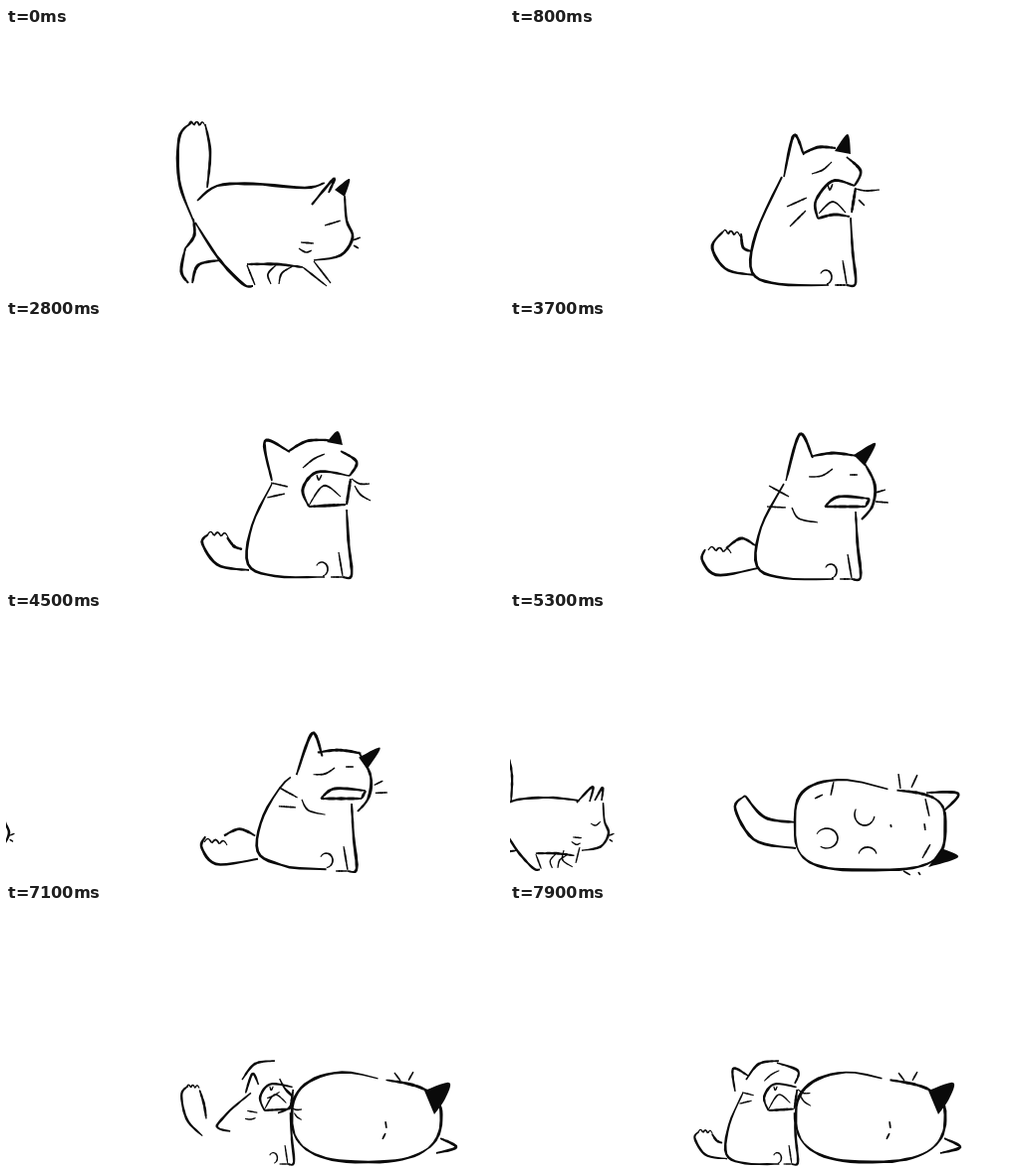
Write an HTML page that moves like this. It is 500 px wide and 266 px high and loops after 8 s.

```html
<!DOCTYPE html>
<html lang="en">
<head>
<meta charset="utf-8">
<title>Two cats</title>
<style>
html, body { margin: 0; width: 100%; height: 100%; overflow: hidden; background: #fff; }
svg { display: block; width: 100vw; height: 100vh; fill: #0a0a0a; }
</style>
</head>
<body>
<svg viewBox="0 0 500 266" preserveAspectRatio="none">
  <g id="big"><path class="brush"/><path class="ink"/></g>
  <g id="small"><path class="brush"/><path class="ink"/></g>
</svg>
<script>
const LOOP = 8000, STEP = 100, SAMPLES = 20;
const BOLD = /^(tail|back|top|bottom|ear|face|mouth|chest|hind|belly|side)/;

const clamp = (v, lo = 0, hi = 1) => Math.max(lo, Math.min(hi, v));
const lerp = (a, b, u) => a + (b - a) * u;
const ease = u => u * u * (3 - 2 * u);
const sample = fn => Array.from({ length: SAMPLES + 1 }, (_, i) => fn(i / SAMPLES));
const power = (v, e) => Math.sign(v) * Math.abs(v) ** e;

// Every stroke has the same number of samples, so any two can be blended.

// Smooth curve through a few key points.
function path(...c) {
  const last = c.length / 2 - 1;
  return sample(u => {
    const i = Math.min(Math.floor(u * last), last - 1), s = u * last - i;
    return [0, 1].map(axis => {
      const at = k => c[2 * clamp(i + k, 0, last) + axis];
      const [a, b, d, e] = [at(-1), at(0), at(1), at(2)];
      return b + s * ((d - a) + s * ((2 * a - 5 * b + 4 * d - e) + s * (3 * (b - d) + e - a))) / 2;
    });
  });
}

// Arc of a squarish oval; its upper edge can sag and ripple towards the right.
function blob({ cx, cy, rx, ry, square = 2, sag = 0, ripple = 0 }, from, to) {
  return sample(u => {
    const a = lerp(from, to, u) * Math.PI / 180;
    const x = power(Math.cos(a), 2 / square), y = power(Math.sin(a), 2 / square);
    const right = (1 + Math.tanh(4 * x)) / 2;
    const dent = y < 0 ? -y * right * (sag + ripple * Math.cos((x - .27) * 12)) : 0;
    return [cx + rx * x, cy + ry * y + dent];
  });
}
const oval = (cx, cy, rx, ry, from, to) => blob({ cx, cy, rx, ry }, from, to);

// Furry tail end.
const ragged = (x0, y0, x1, y1, teeth = 3) => sample(u =>
  [lerp(x0, x1, u), lerp(y0, y1, u) - 4 * Math.abs(Math.sin(u * teeth * Math.PI))]);

const mapPose = (pose, fn) => Object.fromEntries(
  Object.entries(pose).map(([name, pts]) => [name, pts.map(pt => fn(pt, name))]));
const shift = (pose, dx, dy = 0) => mapPose(pose, ([x, y]) => [x + dx, y + dy]);

const walk = {
  tail: path(188, 194, 174, 155, 174, 110, 187, 95),
  tailEdge: path(200, 97, 205, 125, 202, 161),
  tip: ragged(183, 98, 200, 99),
  back: path(320, 156, 300, 161, 248, 157, 212, 159, 192, 174),
  ear: path(307, 178, 329, 152, 324, 166),
  black: path(330, 163, 345, 152, 340, 170),
  face: path(340, 169, 342, 194, 348, 211, 336, 229, 309, 234),
  eye: path(320, 199, 336, 194),
  whiskerR: path(348, 214, 356, 211), whiskerR2: path(349, 219, 354, 222),
  whiskerL: path(296, 216, 309, 217), whiskerL2: path(294, 222, 301, 226, 307, 224),
  hind: path(188, 192, 189, 209, 180, 222),
  hindThigh: path(190, 196, 214, 233, 238, 258, 248, 260),
  hindLeg1: path(180, 222, 176, 245, 183, 257), hindLeg2: path(214, 234, 193, 239, 187, 257),
  belly: path(242, 238, 272, 238, 298, 241),
  leg3: path(242, 239, 250, 259), leg4: path(271, 239, 263, 248, 266, 258),
  leg5: path(288, 240, 277, 247, 274, 258), leg6: path(298, 241, 322, 260),
  leg7: path(309, 235, 326, 257)
};

const sitting = (neckX, neckY) => ({
  back: path(neckX, neckY, 247, 207, 243, 246, 270, 258, 320, 259),
  chest: path(342, 191, 344, 225, 347, 257, 338, 259),
  leg1: path(334, 234, 338, 258), toe: path(338, 259, 326, 259),
  paw: oval(317, 251, 6, 7, -150, 80)
});

const howl = {
  ...sitting(273, 150),
  tail: path(245, 249, 217, 243, 203, 221, 214, 205),
  tailEdge: path(232, 207, 234, 221, 242, 225),
  tip: ragged(213, 207, 231, 210),
  ear: path(275, 150, 285, 108, 295, 128), top: path(295, 126, 310, 120, 327, 121),
  black: path(326, 124, 339, 107, 342, 127),
  face: path(338, 130, 352, 144, 346, 159),
  mouth: path(346, 159, 324, 154, 307, 174, 309, 192),
  mouthLow: path(309, 192, 325, 188, 341, 190), mouthEdge: path(347, 161, 343, 186),
  tongue: path(310, 187, 324, 175, 337, 186), tooth: path(319, 157, 321, 163, 324, 157),
  eye: path(303, 147, 314, 143, 323, 135),
  whiskerR: path(347, 162, 357, 164, 371, 163), whiskerR2: path(350, 173, 356, 179),
  whiskerL: path(278, 180, 298, 171), whiskerL2: path(281, 200, 297, 184)
};

const wail = {
  ...sitting(267, 165),
  tail: path(244, 252, 213, 247, 197, 225, 203, 216),
  tailEdge: path(222, 219, 229, 228, 237, 231),
  tip: ragged(202, 217, 223, 219),
  ear: path(267, 162, 260, 122, 285, 133), top: path(284, 132, 302, 122, 324, 121),
  black: path(322, 123, 333, 112, 338, 126),
  face: path(336, 132, 352, 143, 345, 157),
  mouth: path(345, 157, 313, 153, 298, 170, 304, 188),
  mouthLow: path(304, 188, 341, 186), mouthEdge: path(346, 160, 342, 186),
  tongue: path(304, 187, 319, 167, 336, 178), tooth: path(312, 156, 314, 161, 317, 156),
  eye: path(298, 149, 309, 140, 320, 135),
  whiskerR: path(347, 160, 355, 165, 365, 165), whiskerR2: path(350, 167, 356, 176, 366, 182),
  whiskerL: path(266, 164, 283, 168), whiskerL2: path(262, 179, 280, 175)
};

const sulk = {
  ...shift(sitting(270, 163), 5, 2),
  tail: path(249, 250, 208, 257, 193, 242, 196, 231),
  tailEdge: path(217, 230, 232, 220, 246, 227),
  tip: ragged(199, 232, 222, 235),
  ear: path(277, 162, 291, 115, 304, 139), top: path(304, 137, 325, 134, 348, 137),
  black: path(345, 136, 367, 124, 356, 147),
  face: path(354, 141, 366, 165, 364, 187, 353, 201),
  mouth: path(361, 180, 330, 178, 316, 188),
  mouthLow: path(316, 188, 357, 188), mouthEdge: path(361, 180, 357, 188),
  eye: path(300, 158, 313, 157, 324, 150), brow: path(341, 156, 349, 156),
  cheek: path(283, 189, 290, 200, 309, 204),
  whiskerR: path(367, 174, 377, 171), whiskerR2: path(367, 183, 380, 184),
  whiskerL: path(260, 167, 280, 178), whiskerL2: path(258, 188, 277, 189)
};

const lying = body => ({
  back: blob(body, 275, 150), top: blob(body, 280, 325),
  side: blob(body, 325, 400), bottom: blob(body, 150, 40)
});

const flopped = {
  ...lying({ cx: 361.5, cy: 214, rx: 75.5, ry: 46, square: 3.4, sag: 12 }),
  tail: path(287, 238, 246, 230, 226, 198, 236, 185),
  tailEdge: path(236, 185, 256, 207, 287, 212),
  ear: path(418, 182, 450, 183, 435, 201),
  black: path(433, 238, 450, 247, 420, 257),
  foot: path(306, 188, 314, 184), foot2: path(325, 171, 322, 185),
  paw: oval(318, 228, 11, 10, 205, 485),
  paw2: oval(356, 204, 10, 11, 210, 10), paw3: oval(359, 245, 9, 8, 190, 350),
  eye: path(382, 214, 383, 217), eye2: path(416, 213, 417, 220),
  cheek: path(417, 188, 421, 206), cheek2: path(414, 248, 422, 234),
  whiskerR: path(392, 178, 390, 163), whiskerR2: path(403, 177, 409, 164),
  whiskerL: path(395, 261, 402, 265), whiskerL2: path(410, 262, 412, 265)
};

const rolled = {
  ...lying({ cx: 363, cy: 217, rx: 78, ry: 43, square: 3.2, sag: 6, ripple: 4 }),
  tail: path(290, 253, 252, 256, 235, 240, 239, 228),
  tailEdge: path(239, 228, 262, 232, 284, 226),
  foot: path(291, 188, 294, 166, 303, 177),
  black: path(412, 252, 426, 235, 455, 229, 438, 248),
  paw: path(296, 206, 314, 185, 326, 203),
  paw2: oval(354, 205, 12, 14, 180, 355), paw3: path(384, 202, 391, 194, 398, 194),
  cheek: path(403, 203, 406, 195), cheek2: path(418, 207, 426, 202)
};

const turned = {
  ...lying({ cx: 362, cy: 214, rx: 75, ry: 46, square: 2.6, sag: 10 }),
  ear: path(436, 236, 452, 245, 432, 251),
  black: path(420, 188, 445, 180, 441, 196, 430, 212),
  eye: path(381, 219, 382, 226), eye2: path(381, 231, 378, 237),
  whiskerR: path(396, 178, 390, 170), whiskerR2: path(404, 178, 409, 169)
};

// The kitten is a smaller copy of the big cat, without the black ear.
function kitten({ black, ...pose }, [fromX, fromY], [toX, toY], tall) {
  return mapPose(pose, ([x, y]) => [toX + (x - fromX) * .69, toY + (y - fromY) * tall]);
}

const kittenWalk = {
  ...kitten(walk, [348, 258], [99, 258], .74),
  tailEdge: path(-2, 143, 2, 165, 1, 192),
  back: path(70, 190, 40, 187, 8, 189, -8, 196),
  ear: path(67, 192, 83, 176, 80, 191), ear2: path(85, 190, 93, 177, 92, 190),
  eye: path(81, 213, 86, 215, 91, 211),
  leg6: path(54, 240, 53, 250, 63, 257), leg7: path(70, 237, 66, 253)
};

const loaf = {
  tail: path(8, 245, 4, 221, -8, 210), tailEdge: path(-8, 251, 12, 249),
  back: path(67, 196, 40, 191, 9, 217, 14, 248),
  ear: path(66, 205, 85, 180, 83, 197), ear2: path(87, 193, 94, 182, 94, 195),
  face: path(95, 196, 105, 216, 97, 239, 74, 243),
  eye: path(86, 220, 92, 222, 97, 217),
  whiskerR: path(105, 223, 112, 219), whiskerR2: path(106, 228, 112, 232),
  whiskerL: path(63, 233, 73, 233), whiskerL2: path(66, 240, 74, 238),
  belly: path(14, 248, 35, 256, 76, 257), leg1: path(73, 245, 70, 251, 76, 257)
};

const kittenHowl = {
  ...kitten(wail, [347, 259], [289, 262], .76),
  ear: path(226, 189, 224, 166, 239, 173),
  top: path(237, 177, 250, 161, 270, 158), face: path(268, 160, 289, 168, 286, 181)
};

function blend(a, b, u) {
  const out = {};
  for (const name of new Set([...Object.keys(a), ...Object.keys(b)])) {
    const p = a[name], q = b[name];
    if (p && q) out[name] = p.map((pt, i) => pt.map((v, k) => lerp(v, q[i][k], u)));
    else if (u < .5 ? p : q) out[name] = p || q;
  }
  return out;
}

function stride(pose, phase) {
  return mapPose(pose, ([x, y], name) => {
    const leg = name.match(/leg(\d)/i);
    const swing = leg ? Math.sin(phase) * (leg[1] % 2 ? 9 : -9) : 0;
    return [x + swing * clamp((y - 236) / 22), y];
  });
}

function sequence(keys, t) {
  const i = keys.findLastIndex(k => k[0] <= t);
  const [t0, a] = keys[i], [t1, b] = keys[i + 1] || keys[i];
  return a === b ? a : blend(a, b, ease((t - t0) / (t1 - t0)));
}

function bigCat(t) {
  const walking = shift(stride(walk, t / 125), 33 * clamp(t / 500));
  return sequence([[0, walking], [500, walking], [800, howl], [1800, howl], [2300, wail], [2900, wail],
    [3400, sulk], [4400, sulk], [4900, flopped], [5500, flopped], [6000, rolled], [6600, rolled],
    [7100, turned]], t);
}

function smallCat(t) {
  const dx = t < 6000 ? Math.min(0, (t - 5300) * .12) : 188 * clamp((t - 6500) / 500);
  const moving = t < 5300 || t > 6500;
  const walking = shift(stride(kittenWalk, moving ? (t - 5300) / 110 : 0), dx);
  return sequence([[0, walking], [5500, walking], [5800, loaf], [6500, loaf], [6700, walking],
    [7000, walking], [7200, kittenHowl]], t);
}

// Seeded noise redraws the line a little differently for each drawing.
const noise = seed => {
  const v = Math.sin(seed * 12.9898) * 43758.5453;
  return v - Math.floor(v) - .5;
};

const polygon = pts => `M${pts.map(pt => pt.map(v => v.toFixed(2)).join(' ')).join('L')}Z`;

// Ink stroke that swells in the middle and varies in pressure.
function brush(pts, width, seed) {
  const left = [], right = [];
  pts.forEach(([x, y], i) => {
    const [ax, ay] = pts[Math.max(0, i - 1)], [bx, by] = pts[Math.min(SAMPLES, i + 1)];
    const len = Math.hypot(bx - ax, by - ay) || 1;
    const w = width / 2 * (.6 + .4 * Math.sin(i / SAMPLES * Math.PI) + .3 * noise(seed + i));
    const nx = (ay - by) / len * w, ny = (bx - ax) / len * w;
    left.push([x + nx, y + ny]);
    right.unshift([x - nx, y - ny]);
  });
  return polygon([...left, ...right]);
}

function draw(id, pose, t, scale) {
  let lines = '', ink = '', seed = t / STEP;
  for (const [name, pts] of Object.entries(pose)) {
    seed += 31;
    if (name === 'black') ink += polygon(pts);
    else lines += brush(pts, (BOLD.test(name) ? 2.9 : 1.8) * scale, seed);
  }
  document.querySelector(`#${id} .brush`).setAttribute('d', lines);
  document.querySelector(`#${id} .ink`).setAttribute('d', ink);
}

function render(ms) {
  const t = Math.floor((ms % LOOP) / STEP) * STEP;
  draw('big', bigCat(t), t, 1);
  draw('small', smallCat(t), t, .85);
}

let start;
function tick(now) {
  start ??= now;
  render(now - start);
  requestAnimationFrame(tick);
}
render(0);
requestAnimationFrame(tick);
</script>
</body>
</html>
```
